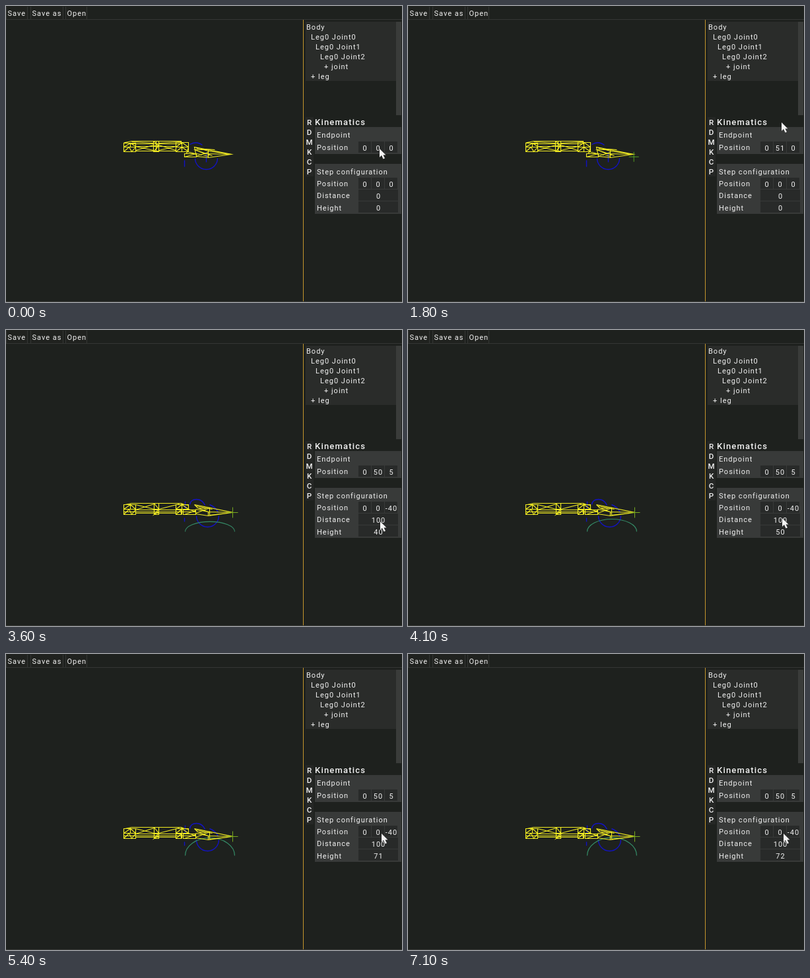
These frames come from a looping animation (600 by 450 pixels, 7.2 s). An HTML page with a canvas:

```html
<!DOCTYPE html>
<html>
<head>
<meta charset="utf-8">
<style>
html, body { margin: 0; width: 100%; height: 100%; overflow: hidden; background: #1e211e; }
canvas { display: block; }
</style>
</head>
<body>
<canvas id="stage" width="600" height="450"></canvas>
<script>
const g = document.getElementById('stage').getContext('2d');
const LOOP = 7200, STEP = 100, CUT = 3300;

// Wireframe leg seen from the two camera poses
const before = {
  body: new Path2D(`M178 208H196V221H178Z M178 214H196 M178 221L186 214L190 221L196 214
    M180 207L190 205H265V209H190Z M188 208V214M178 214L188 208L196 213
    M196 213H257 M196 220H257 M196 219L223 211 M231 211L257 219 M196 213L223 219 M231 219L257 213
    M190 206L223 208 M231 208L265 206
    M223 205H231V221H223Z M223 212H231 M223 205L231 212L223 221 M227 205V221
    M257 207H276V214H257Z M257 214V221H276V214 M266 207V221 M257 214L266 207L276 214 M257 221L266 214L276 221
    M276 214L273 224 M270 224H288V229H270Z M270 229L288 224L306 228 M274 221L286 224
    M285 214L341 225L306 230L288 228Z M285 214L306 220L341 225L300 224L286 218H306V230
    M288 216L316 218 M288 219L312 227 M288 228L306 222`),
  blue: new Path2D(`M320 231A17 17 0 1 1 286 231 M278 210Q288 204 297 211 M270 234V244 M303 222V237`)
};
const after = {
  body: new Path2D(`M178 265H196V280H178Z M178 272H196 M178 280L186 272L190 280L196 272
    M180 265L190 263H265L270 265 M188 264V272 M178 272L188 265L196 272
    M196 273H257 M196 278H257 M178 276H287 M196 273L224 264 M231 272L262 264 M196 265L224 272
    M224 263H231V280H224Z M224 272H231 M224 263L231 272L224 280L231 276
    M257 265H276V272H257Z M257 273H265V280H257Z M266 265V280 M257 272L266 265L276 272 M257 280L265 273
    M265 264L276 266 M268 273H287V280H268Z M270 280L287 274 M276 272L287 276
    M285 265L300 268L343 277L306 282L287 279 M285 265L290 270L306 276L343 277
    M287 272L306 276V282 M287 278L308 270V281L343 277 M288 267L312 272 M290 270L302 271`),
  blue: new Path2D(`M322 282A17 17 0 1 1 288 282 M321 277Q318 269 308 265 M278 265Q279 257 288 257T301 266
    M270 285V291 M271 260V272`)
};

// keys: [time, value] pairs, linear between them
function at(t, keys) {
  let [t0, v0] = keys[0];
  for (const [t1, v1] of keys) {
    if (t < t1) return v0 + (v1 - v0) * (t - t0) / (t1 - t0);
    [t0, v0] = [t1, v1];
  }
  return v0;
}
const endpoint = [[0, 0], [100, 0], [800, 35], [1500, 51]];
const height = [[CUT, 25], [3600, 40], [4700, 63], [5400, 71], [6000, 72]];
const cursorY = [[0, 217], [100, 217], [800, 183], [1500, 177], [CUT - 1, 177],
  [CUT, 298], [3600, 291], [4700, 279], [5400, 273]];
const cursorX = [[0, 566], [CUT, 566], [3600, 567], [4700, 568], [5400, 569]];

function box(x, y, w, h, color) {
  g.fillStyle = color;
  g.fillRect(x, y, w, h);
}
function text(s, x, y, size = 11, align = 'left') {
  g.font = `${size > 11 ? 500 : 400} ${size}px Roboto, sans-serif`;
  g.letterSpacing = size > 12 ? '1.2px' : '1px';
  g.textAlign = align;
  g.textBaseline = 'alphabetic';
  g.fillStyle = '#f2f2f2';
  g.fillText(s, x, y);
}
function stroke(path, color, width = 1) {
  g.strokeStyle = color;
  g.lineWidth = width;
  g.stroke(path);
}
function field(v, x, y, w = 19) {
  box(x, y - 14, w, 17, '#282a29');
  text(v, x + w / 2 + .5, y, 11, 'center');
}
function vector(values, y) {
  values.forEach((v, i) => field(v, 534 + i * 20, y));
}

function panels(ep, step) {
  box(0, 20, 600, 1, '#343634');
  box(450, 21, 1, 428, '#c4962c');
  box(0, 449, 600, 1, '#393b38');
  for (const [s, x, w] of [['Save', 0, 33], ['Save as', 37, 50], ['Open', 90, 33]]) {
    box(x, 1, w, 19, '#343634');
    box(x + 1, 1, w - 2, 19, '#20221f');
    text(s, x + 2.5, 15);
  }

  box(454, 24, 137, 90, '#2a2c2a');
  box(591, 24, 8, 142, '#3a3c3a');
  [['Body', 455], ['Leg0 Joint0', 462], ['Leg0 Joint1', 469], ['Leg0 Joint2', 476], ['+ joint', 482], ['+ leg', 462]]
    .forEach(([s, x], i) => text(s, x, 36 + i * 15));
  box(454, 169, 12, 90, '#252725');
  [...'RDMKCP'].forEach((s, i) => text(s, 460, 181 + i * 15, 11.5, 'center'));

  text('Kinematics', 468, 181, 13);
  box(468, 184, 131, 41, '#383a39');
  text('Endpoint', 471, 200);
  text('Position', 471, 219);
  vector(ep, 220);

  box(468, 240, 131, 76, '#383a39');
  text('Step configuration', 471, 256);
  text('Position', 471, 274);
  text('Distance', 471, 292);
  text('Height', 471, 311);
  vector(step.pos, 275);
  field(step.distance, 534, 293, 60);
  field(step.height, 534, 311, 60);
}

function cross(x, y, r, color) {
  stroke(new Path2D(`M${x - r} ${y}h${2 * r}M${x} ${y - r}v${2 * r}`), color);
}

function pointer(x, y) {
  const p = new Path2D(`M${x} ${y}v13l3 -3l2.5 5.5l2.5 -1l-2.5 -5h4z`);
  stroke(p, '#222');
  g.fillStyle = '#f4f4f4';
  g.fill(p);
}

function draw(t) {
  const late = t >= CUT;
  const y = Math.round(at(t, endpoint)), h = Math.round(at(t, height));
  box(0, 0, 600, 450, '#1e211e');

  g.save();
  g.translate(.5, .5);
  const leg = late ? after : before;
  stroke(leg.blue, '#1212c4', 1.4);
  if (late) {
    const arc = new Path2D();
    arc.ellipse(308.5, 306, 37.5, h * .38, 0, Math.PI, 2 * Math.PI);
    stroke(arc, '#348a66', 1.2);
  }
  stroke(leg.body, '#f0ea22', 1.15);
  if (late) cross(343, 277, 8, '#77a91e');
  else if (y) cross(306.5 + y * .69, 238 - y * .18, 5 + y * .05, y > 45 ? '#529b20' : '#317d20');
  g.restore();

  panels(late ? [0, 50, 5] : [0, y, 0], late
    ? { pos: [0, 0, -40], distance: 100, height: h }
    : { pos: [0, 0, 0], distance: 0, height: 0 });
  pointer(Math.round(at(t, cursorX)), Math.round(at(t, cursorY)));
}

function frame() {
  const t = performance.now() % LOOP;
  draw(Math.floor(t / STEP) * STEP);
  requestAnimationFrame(frame);
}
frame();
</script>
</body>
</html>
```
